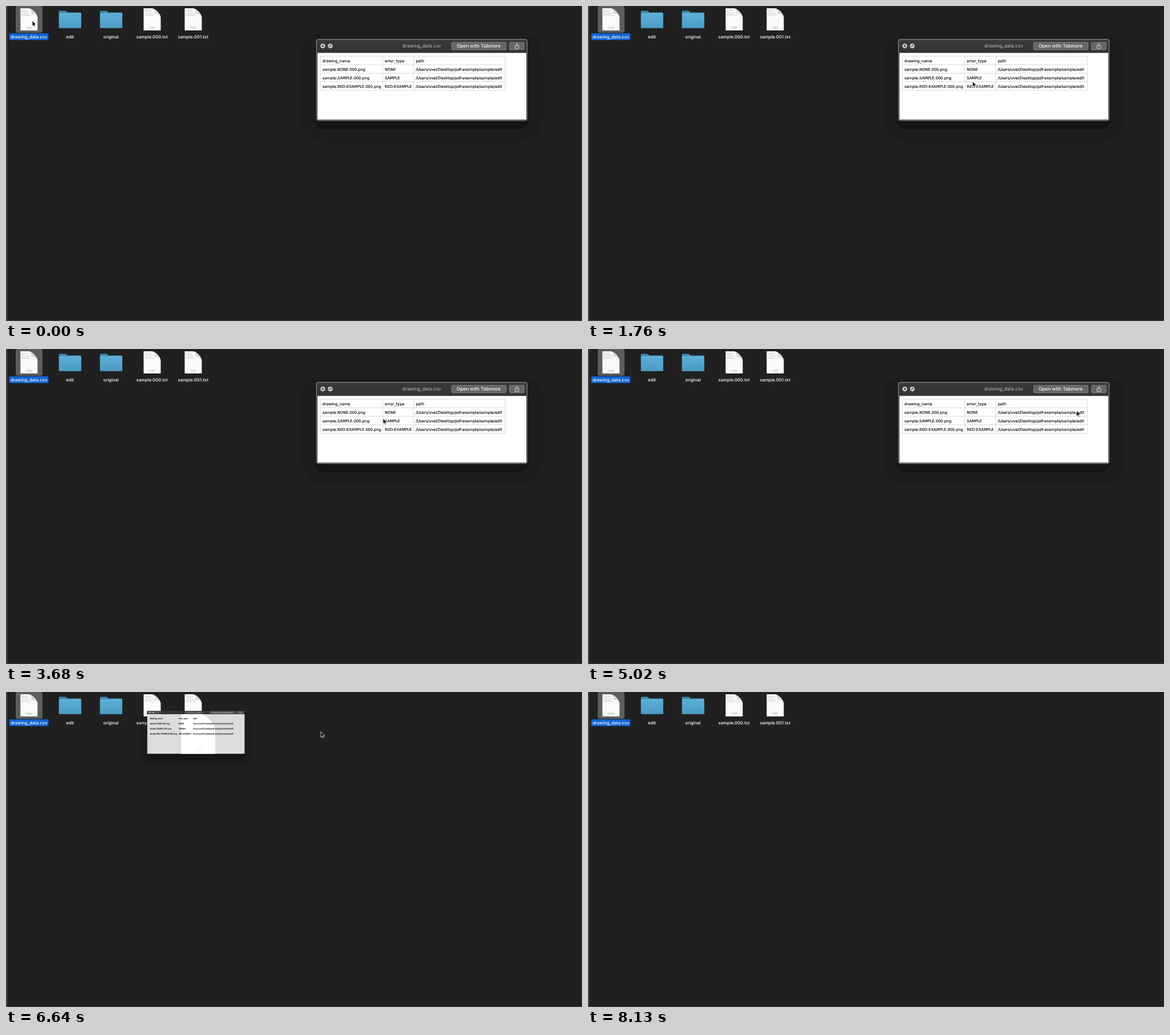
An HTML page for the animation above (8.43 s loop, 1010 by 554 pixels).

```html
<!DOCTYPE html>
<html lang="en">
<head>
<meta charset="utf-8">
<title>File preview</title>
<style>
  html, body { margin: 0; width: 100%; height: 100%; overflow: hidden; background: #202020; }
  svg { display: block; width: 100vw; height: 100vh; text-rendering: geometricPrecision; }
  text { font-family: Inter, "Open Sans", sans-serif; }
  .label { font-size: 7.65px; font-weight: 500; fill: #fff; text-anchor: middle; }
  .kind { font-size: 5px; fill: #858585; text-anchor: middle; letter-spacing: .2px; }
  .cell { font-family: "DejaVu Sans", sans-serif; font-size: 6.65px; stroke: #000; stroke-width: .12px; }
</style>
</head>
<body>
<svg viewBox="0 0 1010 554">
  <defs>
    <linearGradient id="blue" x2="0" y2="1">
      <stop offset="0" stop-color="#5bb0d8"/>
      <stop offset="1" stop-color="#4c9bc2"/>
    </linearGradient>
    <linearGradient id="metal" x2="0" y2="1">
      <stop offset="0" stop-color="#3b3b3b"/>
      <stop offset="1" stop-color="#323232"/>
    </linearGradient>
    <g id="folder">
      <path d="M0 31V2Q0 .5 1.500 .5H11Q12.500 .5 13.500 2T16 3.300H37.500Q39 3.300 39 5V31Z" fill="#428cb1"/>
      <rect y="5" width="39" height="26" rx="1.500" fill="url(#blue)"/>
      <path d="M.5 5.300H38.500" stroke="#7cc6e6" stroke-width=".6"/>
      <path d="M.5 30.600H38.500" stroke="#3f86aa" stroke-width=".8"/>
    </g>
    <g id="page">
      <path d="M0 0H15C21 1 29 9 30 16V39H0Z" fill="#fafafa"/>
      <path d="M15 0C19 2 20 6 19 10C24 9 28 11 30 16C29 9 21 1 15 0Z" fill="#d9d9d9"/>
      <path d="M2 3.500H15M2 5.500H12M2 8H18M2 10.500H15M2 12.500H19" stroke="#bdb8c0" stroke-width=".7" stroke-dasharray="2.500 .5"/>
    </g>
  </defs>

  <rect width="1010" height="554" fill="#202020"/>
  <path d="M1.500 0V554" stroke="#626262"/>
  <path d="M2 553.300H1010" stroke="#434343"/>
  <rect x="17" width="47" height="47" rx="3.500" fill="#5d5d5d"/>
  <rect x="5.500" y="48" width="69" height="12" rx="2" fill="#1263cf"/>
  <g id="files"></g>

  <g id="shadow">
    <rect x="518" y="45" width="423" height="195" rx="42" opacity=".11"/>
    <rect x="541" y="60" width="375" height="157" rx="17" opacity=".28"/>
  </g>
  <g id="bar">
    <path d="M544.500 83V62Q544.500 59 547.500 59H910.500Q913.500 59 913.500 62V83Z" fill="url(#metal)"/>
    <g fill="#d6d6d6">
      <circle cx="555.500" cy="70.300" r="4.100"/>
      <circle cx="568.500" cy="70.300" r="4.100"/>
    </g>
    <g stroke="#333" fill="none">
      <path d="M553.800 68.600L557.200 72M557.200 68.600L553.800 72" stroke-width="1.100"/>
      <path d="M567 71.800L570 68.800M566.800 69.900V72H568.900M568.100 68.600H570.200V70.700" stroke-width=".8"/>
    </g>
    <text x="729" y="73.400" font-size="8.200" fill="#c2c2c2" text-anchor="middle">drawing_data.csv</text>
    <g fill="#666" stroke="#929292" stroke-width=".8">
      <rect x="781.400" y="64" width="95.500" height="13" rx="2"/>
      <rect x="882.800" y="64" width="26" height="13" rx="2"/>
    </g>
    <text x="828.700" y="73.400" font-size="8.250" font-weight="500" fill="#fff" text-anchor="middle">Open with Tabmore</text>
    <path d="M894.300 69H892.600V74.600H899V69H897.300M895.800 72V66.200M894.200 67.700L895.800 66.100L897.400 67.700" fill="none" stroke="#eee" stroke-width=".8"/>
  </g>
  <g id="body">
    <rect id="paper" x="545.800" y="82.500" width="367" height="118"/>
    <path id="grid" fill="none" stroke="#cfcfcf" stroke-width=".8"/>
    <g id="ghost">
      <path d="M673.500 82.500H752C774 90 798 108 802.500 128V200.500H673.500Z" fill="#fff"/>
      <text x="740" y="193" font-size="14" fill="#eaeaea" text-anchor="middle">CSV</text>
    </g>
    <g id="cells"></g>
  </g>
  <g id="frame" fill="none">
    <path d="M545.300 82.500V200.400H913V82.500" stroke="#111"/>
    <rect x="544.300" y="58.800" width="369.500" height="142.600" rx="3" stroke="#a6a6a6"/>
  </g>
  <path id="cursor" d="M0 0V9.600L2.200 7.600L3.700 11L5.300 10.300L3.900 7H6.900Z" stroke="#fff" stroke-width=".8" stroke-linejoin="round"/>
</svg>
<script>
const LOOP = 8430, CLOSE = 6600, GONE = 6700;
const $ = id => document.getElementById(id);
const set = (id, name, value) => $(id).setAttribute(name, value);
const show = (id, on) => set(id, "display", on ? "inline" : "none");
const text = (x, y, cls, str) => `<text class="${cls}" x="${x}" y="${y}">${str}</text>`;

// Desktop icons sit on a regular grid; names without an extension are folders
function icon(name, i) {
  const x = 40.3 + 72 * i;
  const kind = name.split(".").slice(1).pop();
  const art = kind
    ? `<use href="#page" x="${x - 15}" y="4"/>` + text(x + .2, 40.2, "kind", kind.toUpperCase())
    : `<use href="#folder" x="${x - 19.5}" y="8"/>`;
  return art + text(x - .2, 56.8, "label", name);
}
$("files").innerHTML =
  ["drawing_data.csv", "edit", "original", "sample.000.txt", "sample.001.txt"].map(icon).join("");

const table = [["drawing_name", "error_type", "path"]];
for (const type of ["NONE", "SAMPLE", "RED-EXAMPLE"])
  table.push([`sample.${type}.000.png`, type, "/Users/uvel/Desktop/pdf-example/sample/edit"]);
const edges = [551.2, 660.7, 714.8, 875.4];
$("cells").innerHTML = table.map((row, r) =>
  row.map((str, c) => text(edges[c] + 3.6, 98.5 + r * 15, "cell", str)).join("")).join("");
set("grid", "d",
  edges.map(x => `M${x} 88V148.500`).join("") +
  [0, 1, 2, 3, 4].map(r => `M551 ${88.3 + r * 15}H875.500`).join(""));

// The pointer moves in bursts of discrete steps, each along a Bezier curve
// that starts where the last one ended
const burst = (from, to, steps, ...curve) => ({ from, to, steps, curve });
const start = [46, 25.8], button = [552, 69.8];
const bursts = [
  burst(150, 300, 2, [495, 128]),
  burst(590, 1610, 8, [600, 75], [690, 75], [675, 127]),
  burst(1760, 2790, 8, [686, 147], [586.5, 127], [592, 111]),
  burst(2940, 3380, 4, [597, 155], [626.5, 136]),
  burst(3680, 4120, 4, [690, 105], [799, 100]),
  burst(5020, 6050, 8, [1015, 115], [700, 210], [562, 71]),
  burst(6200, 6790, 5, button, button, button),
  burst(7240, 8130, 7, [690, 190], [977, 562])
];

const mix = (a, b, k) => a.map((v, i) => v + (b[i] - v) * k);

function bezier(points, k) {
  while (points.length > 1)
    points = points.slice(1).map((p, i) => mix(points[i], p, k));
  return points[0];
}

function pointer(t) {
  let at = start;
  for (const { from, to, steps, curve } of bursts) {
    if (t < from) break;
    const gap = (to - from) / (steps - 1);
    const step = Math.min(steps, 1 + Math.floor((t - from + 6) / gap));
    at = bezier([at, ...curve], step / steps);
  }
  return at;
}

function draw(t) {
  const open = t < CLOSE, closing = !open && t < GONE + 85;
  for (const id of ["shadow", "bar", "body"]) show(id, open || closing);
  for (const id of ["frame", "grid"]) show(id, open);
  show("ghost", closing);

  // While closing, the bar shrinks more than the content below it
  const squash = (id, sy, y) =>
    set(id, "transform", closing ? `matrix(.465 0 0 ${sy} -6.1 ${y})` : "");
  squash("shadow", .5, 12);
  squash("bar", .26, 17.7);
  squash("body", .59, -9.64);
  set("bar", "opacity", closing ? .85 : 1);
  set("paper", "fill", closing ? "#dcdcdc" : "#fff");
  set("cursor", "transform", `translate(${pointer(t)})`);
}

function tick() {
  draw(performance.now() % LOOP);
  requestAnimationFrame(tick);
}
tick();
</script>
</body>
</html>
```
